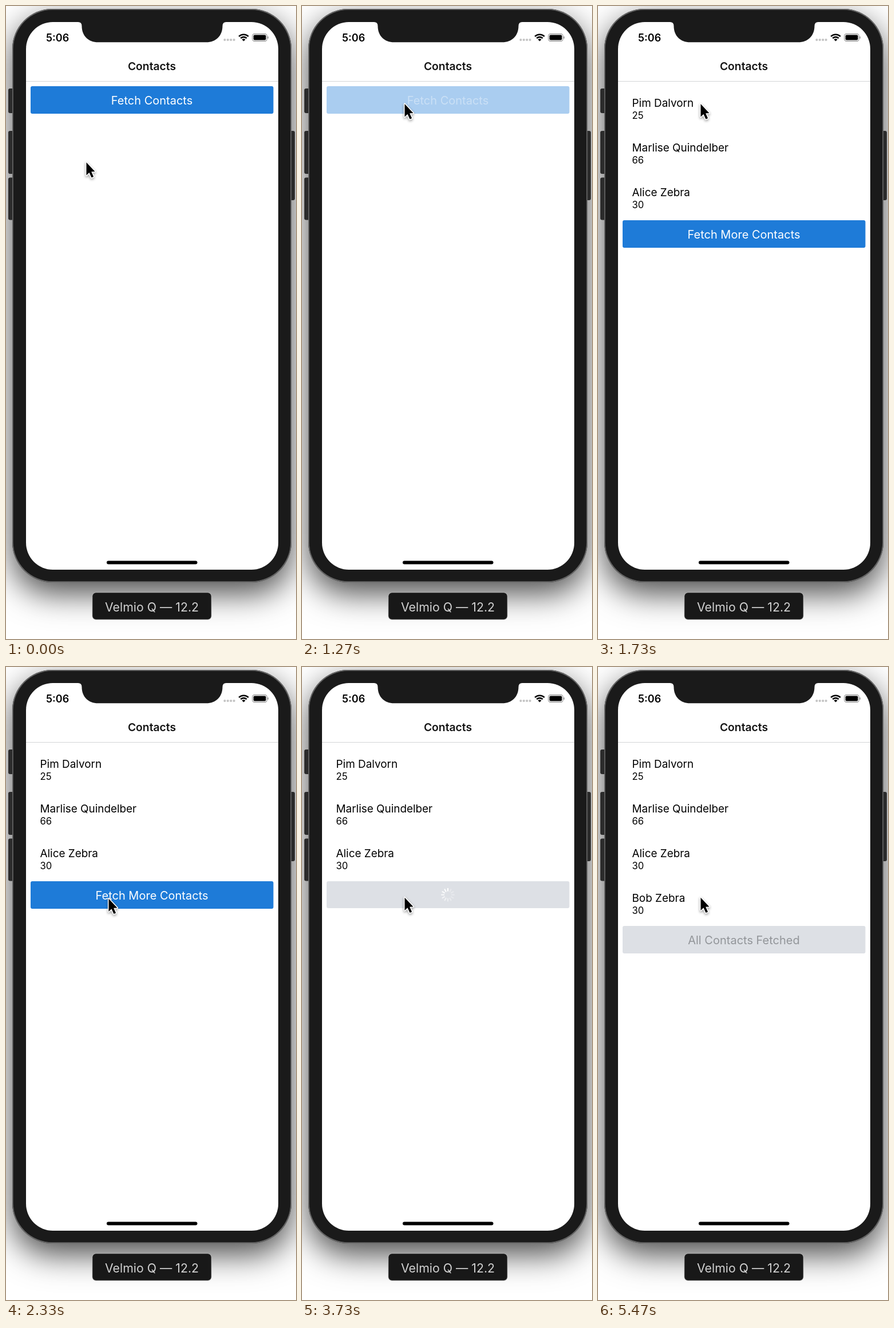
Write an HTML page with a canvas that moves like this. It is 507 px wide and 1105 px high and loops after 5.54 s.

```html
<!DOCTYPE html>
<html lang="en">
<head>
<meta charset="utf-8">
<title>Contacts</title>
<style>
html, body { margin: 0; width: 100%; height: 100%; overflow: hidden; background: #fff; }
canvas { display: block; width: 507px; height: 1105px; }
</style>
</head>
<body>
<canvas id="stage" width="507" height="1105"></canvas>
<script>
const ctx = document.getElementById('stage').getContext('2d');
const LOOP = 5540, TICK = 1000 / 15;
const FONT = 'Inter, "Liberation Sans", sans-serif';
const BLUE = '#1e7bd8', GREY = '#dde0e5';

// Ticks at which the app changes state
const PRESS_1 = 18, LOAD_1 = 22, LIST_1 = 26;
const PRESS_2 = 51, LOAD_2 = 55, LIST_2 = 57;

const PEOPLE = [
  ['Pim Dalvorn', '25'],
  ['Marlise Quindelber', '66'],
  ['Alice Zebra', '30'],
  ['Bob Zebra', '30']
];

// Pointer path: tick, x, y
const PATH = [
  [1, 140.5, 273], [6, 279, 188], [9, 196, 166.5], [10, 180, 170], [12, 179.5, 171],
  [27, 179.5, 171], [33, 181, 400], [35, 179.5, 404.5], [36, 323, 404],
  [41, 177.5, 398], [44, 179.5, 402.5]
];

const ease = p => p < 0.5 ? 2 * p * p : 1 - 2 * (1 - p) * (1 - p);
const clamp = p => Math.max(0, Math.min(1, p));

function box(x, y, w, h, r, fill) {
  ctx.beginPath();
  ctx.roundRect(x, y, w, h, r);
  ctx.fillStyle = fill;
  ctx.fill();
}

function text(str, x, y, size, color, align = 'left', weight = 400) {
  ctx.font = `${weight} ${size}px ${FONT}`;
  ctx.textAlign = align;
  ctx.fillStyle = color;
  ctx.fillText(str, x, y);
}

function phone() {
  ctx.fillStyle = '#fff';
  ctx.fillRect(0, 0, 507, 1105);

  ctx.save();
  ctx.shadowColor = 'rgba(0,0,0,.7)';
  ctx.shadowBlur = 55;
  ctx.shadowOffsetY = 20;
  box(11, 5, 488, 1001, 70, '#1a1a1a');
  ctx.restore();

  for (const [x, y, h] of [[4, 144, 43], [4, 218, 75], [4, 299.5, 74], [495, 218, 121]]) {
    box(x, y, 10, h, 3, '#2b2b2b');
  }
  box(11, 5, 488, 1001, 70, '#666');
  box(12.7, 6.7, 484.6, 997.6, 68.5, '#1a1a1a');
  box(35, 28, 441, 956, 47, '#fff');

  ctx.beginPath();
  ctx.moveTo(126, 27);
  ctx.lineTo(126, 28);
  ctx.quadraticCurveTo(132.5, 28, 132.5, 35);
  ctx.bezierCurveTo(132.5, 52, 144, 63.3, 161, 63.3);
  ctx.lineTo(350, 63.3);
  ctx.bezierCurveTo(367, 63.3, 378.5, 52, 378.5, 35);
  ctx.quadraticCurveTo(378.5, 28, 385, 28);
  ctx.lineTo(385, 27);
  ctx.fillStyle = '#1a1a1a';
  ctx.fill();

  box(176, 968.5, 158.5, 6, 3, '#000');
  box(150.5, 1023.5, 209, 48, 6.5, '#b5b5b5');
  box(151.3, 1024.3, 207.4, 46.4, 6, '#181818');
  text('Velmio Q — 12.2', 255, 1056.5, 21.3, '#d2d2d2', 'center');
}

function statusBar() {
  text('5:06', 70, 61.7, 18, '#000', 'left', 600);
  for (let i = 0; i < 4; i++) box(380.3 + i * 5.4, 57, 4.2, 4.2, 2.1, '#c4c4c4');

  ctx.lineWidth = 2.6;
  ctx.strokeStyle = ctx.fillStyle = '#000';
  for (const r of [11.8, 7.4]) {
    ctx.beginPath();
    ctx.arc(415.5, 61.5, r, -Math.PI * 0.75, -Math.PI * 0.25);
    ctx.stroke();
  }
  ctx.beginPath();
  ctx.moveTo(415.5, 61.5);
  ctx.arc(415.5, 61.5, 4.3, -Math.PI * 0.75, -Math.PI * 0.25);
  ctx.fill();

  ctx.beginPath();
  ctx.roundRect(430.7, 48.6, 25.6, 12.8, 3.8);
  ctx.lineWidth = 1.1;
  ctx.strokeStyle = '#909090';
  ctx.stroke();
  box(432.6, 50.5, 21.8, 9, 2, '#000');
  box(457.4, 53, 1.6, 4, 1, '#999');

  text('Contacts', 255, 112.3, 19.3, '#141414', 'center', 600);
  ctx.fillStyle = '#d3d5d6';
  ctx.fillRect(35, 131, 441, 1);
}

function contacts(count) {
  PEOPLE.slice(0, count).forEach(([name, age], i) => {
    text(name, 59.5, 175.8 + i * 78, 18.9, '#000');
    text(age, 59.5, 197.3 + i * 78, 16.7, '#000');
  });
}

function button(y, label, fill, color, alpha = 1) {
  ctx.globalAlpha = alpha;
  box(43, y, 424.5, 48, 3, fill);
  text(label, 255, y + 32, 20, color, 'center');
  ctx.globalAlpha = 1;
}

function loader(y, age) {
  box(43, y, 424.5, 47, 3, GREY);
  const head = Math.floor(age * TICK * 12 / 1000);
  ctx.save();
  ctx.translate(255, y + 23.7);
  for (let i = 0; i < 12; i++) {
    const behind = ((head - i) % 12 + 12) % 12;
    ctx.save();
    ctx.rotate(i * Math.PI / 6);
    box(-1.1, -12, 2.2, 6.2, 1.1, `rgba(255,255,255,${Math.max(0.3, 1 - behind * 0.09)})`);
    ctx.restore();
  }
  ctx.restore();
}

const pressAlpha = age => 1 - 0.8 * ease(clamp((age + 0.5) / 2.25));

function screen(n) {
  if (n < LOAD_1) {
    button(140, 'Fetch Contacts', BLUE, '#fff', n < PRESS_1 ? 1 : pressAlpha(n - PRESS_1));
  } else if (n < LIST_1) {
    loader(140, n - LOAD_1);
  } else if (n < LIST_2) {
    contacts(3);
    if (n < LOAD_2) {
      button(374, 'Fetch More Contacts', BLUE, '#fff', n < PRESS_2 ? 1 : pressAlpha(n - PRESS_2));
    } else {
      loader(374, n - LOAD_2);
    }
  } else {
    contacts(4);
    button(452, 'All Contacts Fetched', GREY, '#929599');
  }
}

function pointerAt(n) {
  const i = PATH.findIndex(k => k[0] > n);
  if (i === 0) return PATH[0].slice(1);
  if (i < 0) return PATH[PATH.length - 1].slice(1);
  const a = PATH[i - 1], b = PATH[i];
  const p = ease((n - a[0]) / (b[0] - a[0]));
  return [a[1] + (b[1] - a[1]) * p, a[2] + (b[2] - a[2]) * p];
}

function pointer(n) {
  ctx.save();
  ctx.translate(...pointerAt(n));
  ctx.beginPath();
  ctx.moveTo(0, 0);
  for (const [x, y] of [[0, 22.5], [5, 17.8], [9, 26.6], [12.6, 25], [8.7, 16.3], [15, 16]]) {
    ctx.lineTo(x, y);
  }
  ctx.closePath();
  ctx.shadowColor = 'rgba(0,0,0,.4)';
  ctx.shadowBlur = 4;
  ctx.shadowOffsetY = 2;
  ctx.lineWidth = 3.2;
  ctx.lineJoin = 'round';
  ctx.strokeStyle = '#fff';
  ctx.stroke();
  ctx.shadowColor = 'transparent';
  ctx.fillStyle = '#000';
  ctx.fill();
  ctx.restore();
}

let last = -1;
function draw(now) {
  const n = Math.floor((now % LOOP + 4) / TICK);
  if (n !== last) {
    last = n;
    phone();
    statusBar();
    screen(n);
    pointer(n);
  }
}

function loop() {
  draw(performance.now());
  requestAnimationFrame(loop);
}
loop();
</script>
</body>
</html>
```
